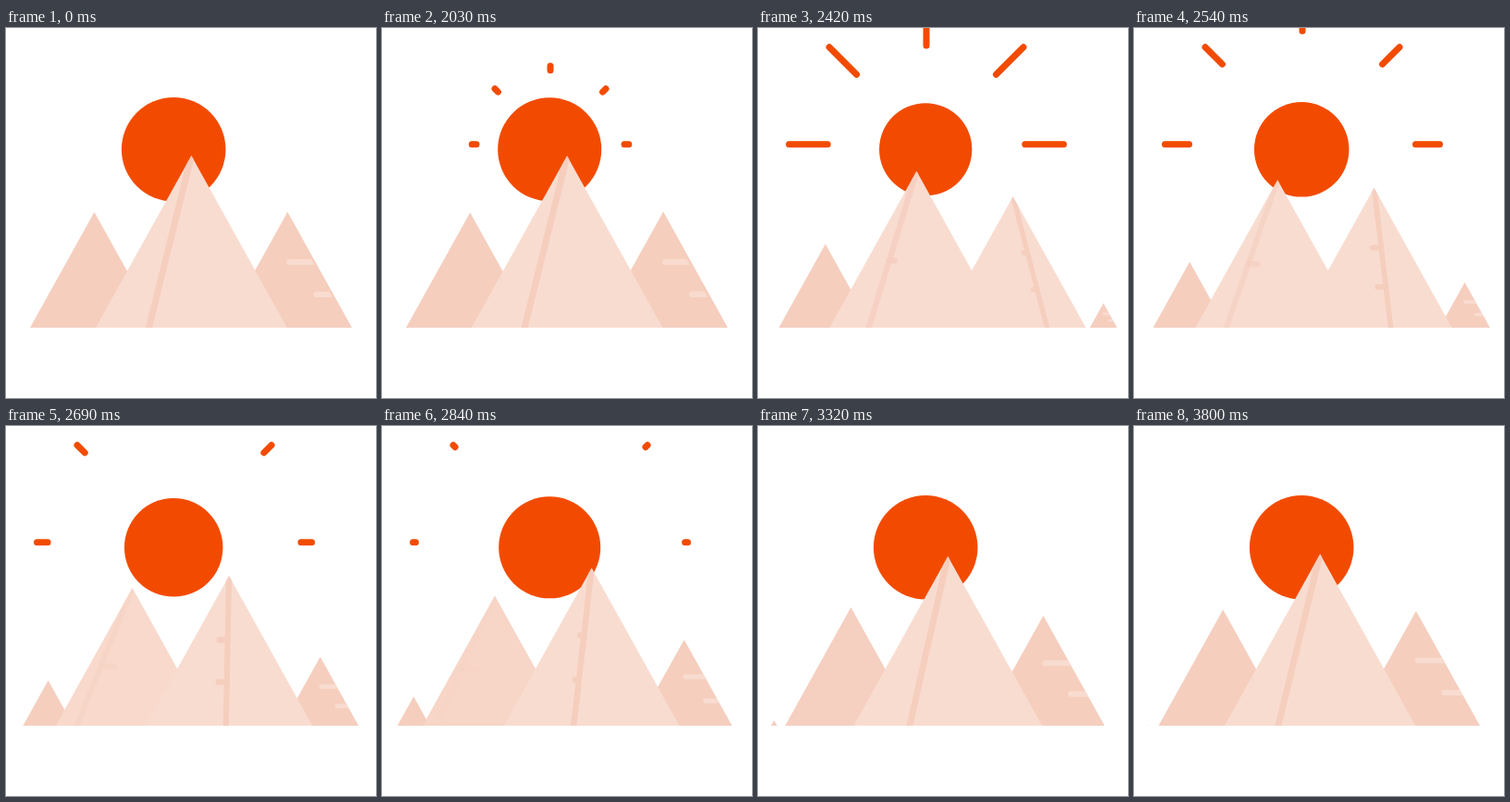
An HTML page with a canvas that plays this animation: 400 by 400 pixels, repeating every 3830 ms.

```html
<!DOCTYPE html>
<html>
<head>
<meta charset="utf-8">
<title>Mountains</title>
<style>
html, body { margin: 0; width: 100%; height: 100%; overflow: hidden; background: #fff; }
canvas { display: block; width: 400px; height: 400px; }
</style>
</head>
<body>
<canvas id="stage" width="400" height="400"></canvas>
<script>
const ctx = document.getElementById('stage').getContext('2d');
const LOOP = 3830, START = 2030, STEP = 30;
const BASE = 324, SLOPE = 0.556;
const SUN = '#f24b00', DARK = [245, 206, 190], LIGHT = [249, 220, 208];

// Resting slots of the peaks: x of the apex and height
const FAR_LEFT = { x: 13.5, h: 0 }, LEFT = { x: 95.5, h: 125 }, CENTER = { x: 200.4, h: 186 };
const RIGHT = { x: 304.3, h: 125 }, FAR_RIGHT = { x: 392, h: 0 };

const clamp = v => Math.max(0, Math.min(1, v));
const mix = (a, b, k) => a + (b - a) * k;
const shade = k => `rgb(${DARK.map((d, i) => Math.round(mix(d, LIGHT[i], k))).join(',')})`;
const easeOut = v => 1 - (1 - clamp(v)) ** 2;
const bend = (p, k) => p + k * p * (1 - p);
const bump = v => Math.sin(Math.PI * clamp(v)) ** 2;

// Gentle start, then an exponential approach to 1
const slide = t => 1 - Math.cosh((t - 2064) / 770) ** -3.13;

function line(x0, y0, x1, y1, width, color, cap = 'round') {
  ctx.lineWidth = width;
  ctx.strokeStyle = color;
  ctx.lineCap = cap;
  ctx.beginPath();
  ctx.moveTo(x0, y0);
  ctx.lineTo(x1, y1);
  ctx.stroke();
}

function drawSun(t) {
  const dip = 6.4 * bump(clamp((t - 2020) / 1080) ** 0.58);
  ctx.fillStyle = SUN;
  ctx.beginPath();
  ctx.arc(181.2, 131.3, 56.3 - dip, 0, Math.PI * 2);
  ctx.fill();

  const head = easeOut((t - 2015) / 420), tail = easeOut((t - 2260) / 730);
  if (head === 0 || tail === 1) return;
  const r0 = mix(80, 148.5, tail), r1 = mix(80, 148.5, head);
  for (let i = 0; i < 5; i++) {
    const c = Math.cos(i * Math.PI / 4), s = Math.sin(i * Math.PI / 4);
    line(182 + c * r0, 125.7 - s * r0, 182 + c * r1, 125.7 - s * r1, 7, SUN);
  }
}

// Peak on its way between two slots; details are clipped and scaled to its height
function peak(from, to, k, tone, details) {
  const x = mix(from.x, to.x, k), h = mix(from.h, to.h, k);
  if (h < 0.5) return;
  ctx.save();
  ctx.translate(x, BASE - h);
  ctx.scale(h, h);
  ctx.beginPath();
  ctx.moveTo(0, 0);
  ctx.lineTo(SLOPE, 1);
  ctx.lineTo(-SLOPE, 1);
  ctx.closePath();
  ctx.fillStyle = shade(tone);
  ctx.fill();
  if (details) {
    ctx.clip();
    details(h);
  }
  ctx.restore();
}

function snow(h, alpha) {
  const width = 0.55 / Math.sqrt(h);
  ctx.globalAlpha = clamp(alpha);
  line(0.016, 0.432, 0.6, 0.432, width, shade(1));
  line(0.248, 0.712, 0.8, 0.712, width, shade(1));
  ctx.globalAlpha = 1;
}

function ridge(lean, alpha, notch, levels) {
  ctx.globalAlpha = clamp(alpha);
  line(0, 0, lean * 1.1, 1.1, 0.038, shade(0), 'butt');
  if (Math.abs(notch) > 0.01) {
    const end = notch - 0.02 * Math.sign(notch);
    for (const y of levels) line(lean * y, y, lean * y + end, y, 0.04, shade(0));
  }
  ctx.globalAlpha = 1;
}

function leaving(p) {
  const lean = mix(-0.247, -SLOPE, bend(p, -0.43));
  peak(CENTER, LEFT, p, clamp(2 - 2 * p), () => ridge(lean, 1 - p, 0.2 * p, [0.57]));
}

function arriving(p) {
  const lean = mix(SLOPE, -0.247, bend(p, 0.46));
  peak(RIGHT, CENTER, p, clamp(5 * p), h => {
    snow(h, 1 - 7 * p);
    ridge(lean, 1, -0.085 * bump(p), [0.428, 0.709]);
  });
}

function draw(t) {
  const p = t < START ? 0 : slide(t);
  const late = p * (1 - 0.85 * (1 - p) ** 4);

  ctx.fillStyle = '#fff';
  ctx.fillRect(0, 0, 400, 400);
  drawSun(t);
  peak(LEFT, FAR_LEFT, p, 0);
  peak(FAR_RIGHT, RIGHT, late, 0, h => snow(h, 1));

  // The peak nearer the middle stands in front
  const order = p < 0.5 ? [arriving, leaving] : [leaving, arriving];
  for (const part of order) part(p);
}

const origin = performance.now();
function tick() {
  const t = (performance.now() - origin) % LOOP;
  draw(t < START ? 0 : START + Math.floor((t - START) / STEP) * STEP);
  requestAnimationFrame(tick);
}
tick();
</script>
</body>
</html>
```
